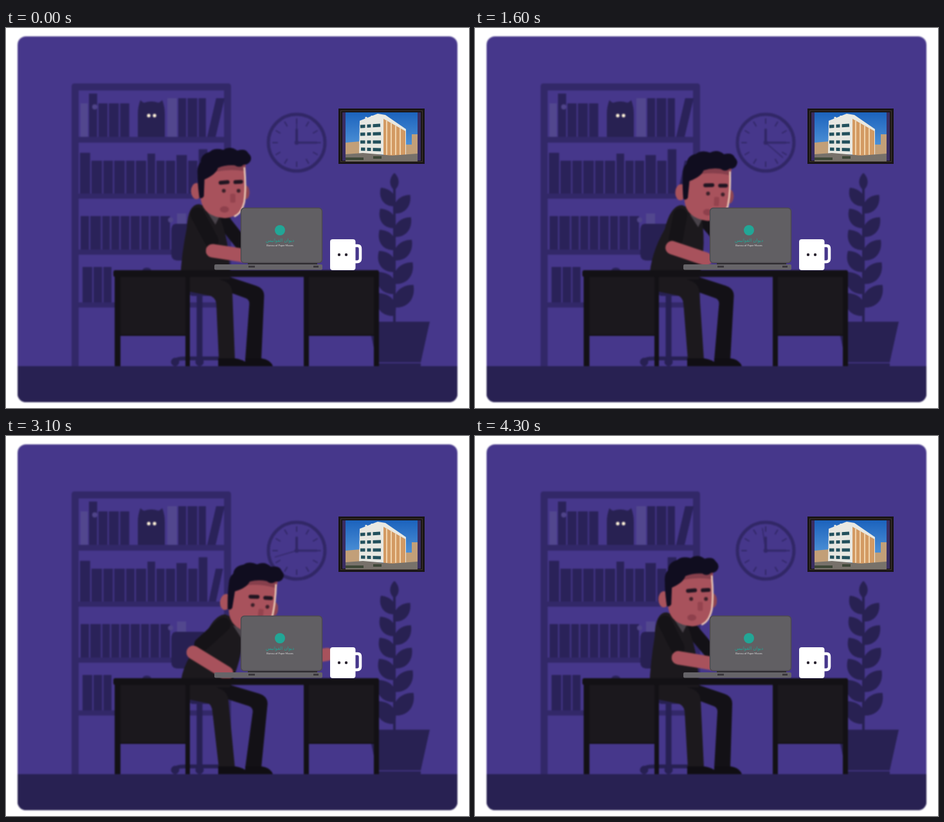
An HTML page that plays this animation: 720x590 px, repeating every 4400 ms.

```html
<!DOCTYPE html>
<html lang="en">
<head>
<meta charset="utf-8">
<title>Late night at the desk</title>
<style>
  html, body { margin: 0; width: 100%; height: 100%; overflow: hidden; background: #fff; }
  svg { display: block; width: 100vw; height: 100vh; }
  .soft { filter: blur(.8px); }
  .line { fill: none; stroke-linecap: round; stroke-linejoin: round; }
</style>
</head>
<body>
<svg viewBox="0 0 720 590">
  <defs>
    <clipPath id="panel"><rect x="18" y="13" width="684" height="568" rx="13"/></clipPath>
    <linearGradient id="sky" x1="0" y1="0" x2="0" y2="1">
      <stop offset="0" stop-color="#1c63bd"/><stop offset="1" stop-color="#64a6e2"/>
    </linearGradient>
  </defs>

  <g class="soft"><g clip-path="url(#panel)">
    <rect x="18" y="13" width="684" height="568" fill="#46378b"/>
    <rect x="18" y="525" width="684" height="56" fill="#282152"/>

    <g fill="#322868">
      <path d="M102 525V91Q102 86 107 86H345Q350 86 350 91V525H339V97H113V525Z"/>
      <path d="M104 169H348V178H104ZM104 257H348V265H104ZM104 344H348V352H104ZM104 426H348V434H104Z"/>
    </g>
    <g id="books"></g>
    <path d="M205 169V134Q205 122 209 112Q213 116 215 116Q226 112 237 116Q240 115 243 112Q247 122 247 134V169Z" fill="#282152"/>
    <g fill="#fff3d8"><circle cx="222" cy="136" r="2.7"/><circle cx="231" cy="136" r="2.7"/></g>
    <g fill="#4f4489"><circle cx="138" cy="122.500" r="4"/><circle cx="256" cy="298" r="4"/></g>
    <path d="M212 378Q212 372 219 372Q226 372 226 378Z" fill="#2a2259"/>

    <g class="line" stroke="#312766">
      <circle cx="452" cy="178" r="44" stroke-width="5"/>
      <g id="ticks" stroke-width="2"></g>
      <path d="M452 178V158" stroke-width="4"/>
      <path d="M452 178H483" stroke-width="3"/>
      <path id="second" d="M452 178V143" stroke-width="1.500"/>
      <circle cx="452" cy="178" r="3" fill="#312766"/>
    </g>

    <g fill="#282152">
      <path d="M563 456H659L645 519H577ZM579 520.500H645V525H579Z"/>
      <path d="M604 245V458" stroke="#282152" stroke-width="4"/>
      <g id="leaves"></g>
    </g>

    <g fill="#272052" stroke="#272052">
      <path d="M264 304H308L312 361H266Q257 361 257 350V316Q257 304 264 304Z" stroke="none"/>
      <path class="line" d="M290 411H326" stroke-width="10"/>
      <path class="line" d="M301 415V512" stroke-width="9"/>
      <path class="line" d="M264 516Q266 513 280 513H338" stroke-width="6"/>
      <circle cx="263" cy="518.500" r="6"/><circle cx="301" cy="518.500" r="6"/>
    </g>

    <path id="farLeg" fill="#131116"/>
    <path d="M372 525V513H398Q411 515 415 525Z" fill="#100e13"/>
    <path id="nearLeg" fill="#1c191d"/>
    <path d="M330 525V513H357Q374 516 378 525Z" fill="#100e13"/>

    <path id="farHand" class="line" stroke="#a8525c" stroke-width="20"/>
    <path id="farSleeve" class="line" stroke="#131116" stroke-width="21"/>
    <path id="torso" fill="#1c191d"/>
    <path id="collar" d="M314 284L334 290L327 304Z" fill="#49434a"/>

    <g id="head">
      <ellipse cx="374" cy="254" rx="6" ry="11" fill="#8f4652"/>
      <path d="M304 212V264Q308 292 342 294Q366 292 373 270L374 206Z" fill="#a8525c"/>
      <ellipse cx="297.500" cy="252" rx="8.500" ry="12.500" fill="#a8525c"/>
      <path d="M326 211H373V221Q350 217 327 222Z" fill="#863f4c"/>
      <path class="line" d="M372 216Q375 245 372 268Q368 286 357 291" stroke="#f2d2bd" stroke-width="2.500"/>
      <path d="M302 262Q299 240 299 225Q298 213 304 207Q304 195 318 191Q326 184 339 188Q350 181 361 189Q374 185 378 193Q385 199 381 206Q378 211 371 211Q365 217 357 212Q343 211 331 216Q328 226 310 234L309 260Q306 265 302 262Z" fill="#100d1f"/>
      <path class="line" d="M335 239L346 238M358 238L367 237.500" stroke="#201521" stroke-width="6"/>
      <circle cx="340" cy="251.500" r="3" fill="#3b2029"/>
      <circle cx="363" cy="251.500" r="3" fill="#3b2029"/>
      <rect x="350" y="256" width="8" height="14" rx="2" fill="#94434e"/>
      <ellipse cx="341" cy="280.500" rx="7" ry="5" fill="#8e404c"/>
    </g>

    <path id="sleeve" class="line" stroke="#151317" stroke-width="22"/>
    <path id="forearm" class="line" stroke="#a8525c" stroke-width="21"/>

    <path d="M169 380H286V525H279V478H178V525H169ZM463 380H580V525H572V478H471V525H463Z" fill="#131115"/>
    <path d="M178 386H279V476H178ZM471 386H572V476H471Z" fill="#1b181d"/>
    <rect x="167" y="376" width="413" height="10.500" rx="3" fill="#131115"/>
  </g></g>

  <g>
    <rect x="517" y="125" width="134" height="86" fill="#191515"/>
    <rect x="520.500" y="128.500" width="127" height="79" fill="none" stroke="#40352f"/>
    <rect x="523" y="131" width="122" height="75" fill="#3a2d63"/>
    <rect x="528" y="131" width="112" height="76" fill="url(#sky)"/>
    <path d="M528 178L551 176V198H528ZM620 181H640V198H620ZM631 165H640V183H631Z" fill="#c29f78"/>
    <path d="M550 144L578 133L590 135L622 157V198L549 195Z" fill="#e8e8e2"/>
    <path d="M587 141L621 160V198H587Z" fill="#d39a63"/>
    <path d="M592 143V197M599 147V197M606 151V197M613 155V197" stroke="#f0d3ac" stroke-width="2"/>
    <path d="M551 153L582 151M551 165L583 164M551 177H583M552 188L583 189" stroke="#22505c" stroke-width="5"/>
    <path d="M560 138V196M569 136V197" stroke="#e8e8e2" stroke-width="3"/>
    <path d="M528 196L555 194L600 198L640 195V207H528Z" fill="#77716a"/>
    <path d="M528 201H556V205H528ZM571 199H584V203H571Z" fill="#3d4737"/>
  </g>

  <g id="cup">
    <rect x="-20" y="-24" width="39.500" height="48" rx="4" fill="#fff"/>
    <path d="M18 -14H23Q27 -14 27 -9V6Q27 11 22 11H18" fill="none" stroke="#fff" stroke-width="4.500"/>
    <circle cx="-6" r="2.200" fill="#2a2430"/><circle cx="5" r="2.200" fill="#2a2430"/>
  </g>

  <g>
    <rect x="376" y="362" width="108" height="7" fill="#29272b"/>
    <rect x="365.500" y="279.500" width="126" height="85" rx="5" fill="#615f63" stroke="#4d4a4f" stroke-width="1.500"/>
    <rect x="324" y="367" width="168" height="8.500" rx="2" fill="#666468"/>
    <path d="M377 370.500H387M478 370.500H486" stroke="#3b383d" stroke-width="3"/>
    <circle cx="426" cy="314" r="8" fill="#22a696"/>
    <g text-anchor="middle">
      <text x="426" y="332" font-size="7" fill="#22a696" font-family="'DejaVu Sans', sans-serif">ديوان الفوانيس</text>
      <text x="426" y="338.500" font-size="4" fill="#dedede" font-family="Lato, sans-serif">Bureau of Paper Moons</text>
    </g>
  </g>
</svg>
<script>
const LOOP = 4400, STEP = 100, TYPING = 760;
const el = id => document.getElementById(id);
const set = (id, name, value) => el(id).setAttribute(name, value);

let seed = 7;
const random = () => (seed = seed * 16807 % 2147483647) / 2147483647;

// Fills a stretch of shelf; the first book may be pale and the last may lean.
function stack(floor, left, right, height, pale, lean) {
  let books = '';
  for (let x = left; x < right - 8;) {
    const width = Math.min(11 + random() * 6, right - x);
    const top = floor - height - (random() < .3 ? 5 + random() * 14 : 0);
    const color = pale && x === left ? '#52478e' : '#2a2259';
    const shift = x + width > right - 10 ? lean : 0;
    books += `<path fill="${color}" d="M${x} ${floor}L${x + shift} ${top}h${width}L${x + width} ${floor}Z"/>`;
    x += width + 2;
  }
  return books;
}
el('books').innerHTML =
  stack(169, 116, 198, 52, true, 0) + stack(169, 251, 326, 60, true, 14) +
  stack(257, 115, 330, 51, false, 11) + stack(344, 116, 264, 52, false, 0) +
  stack(344, 266, 281, 56, true, 0) + stack(426, 119, 168, 55, false, 0);

el('ticks').innerHTML = Array.from({ length: 12 }, (_, i) =>
  `<path d="M452 141V148" transform="rotate(${i * 30} 452 178)"/>`).join('');

const leaf = (y, angle, length, width) =>
  `<path d="M0 0C${-width} ${-length * .3} ${-width * .75} ${-length * .75} 0 ${-length}
    C${width * .75} ${-length * .75} ${width} ${-length * .3} 0 0Z"
    transform="translate(604 ${y}) rotate(${angle})"/>`;
let leaves = leaf(252, 0, 27, 10);
for (let i = 0; i < 6; i++) {
  leaves += leaf(277 + 34 * i, -36, 36 + 1.6 * i, 15 + i);
  if (i < 5) leaves += leaf(288 + 36.5 * i, 40, 38 + 2 * i, 15 + i);
}
el('leaves').innerHTML = leaves;

const mix = (a, b, u) => a + (b - a) * u;
function ramp(t, from, to) {
  const u = Math.min(1, Math.max(0, (t - from) / (to - from)));
  return u * u * (3 - 2 * u);
}

function draw(t) {
  // He leans over to fetch the cup, drinks, puts it back and types on.
  const reach = ramp(t, 1250, 1950) - ramp(t, 3150, 3550);
  const lift = ramp(t, 1950, 2350) - ramp(t, 2650, 3050);
  const lean = reach - lift;
  const typingTime = (t < 2000 ? t + LOOP : t) - 3900;
  const typing = Math.cos(2 * Math.PI * typingTime / TYPING);
  const calm = (1 - reach) ** 2;

  const dx = 39 * lean - 8 * lift + calm * (1.8 + 5.7 * typing);
  const dy = 10 * lean - 6 * lift + calm * (.8 - .8 * typing);
  const tilt = 7 * lean - 2 * lift;
  set('head', 'transform', `translate(${dx} ${dy}) rotate(${tilt} 335 290)`);
  set('collar', 'transform', `translate(${dx} ${dy})`);
  set('second', 'transform', `rotate(${360 * t / LOOP} 452 178)`);

  const shoulderY = 273 + dy * .4;
  set('torso', 'd', `M271 390Q273 350 ${282 + dx * .65} ${310 + dy * .5}Q${284 + dx} ${shoulderY} ${302 + dx} ${shoulderY}
    L${330 + dx} ${284 + dy * .5}Q${350 + dx * .6} 330 348 390Z`);

  const elbowX = 316 - 25 * lean + 11.5 * calm * (1 + typing);
  const elbowY = 336 + (elbowX - 291) * .33;
  const bend = Math.max(0, 316 - elbowX);
  const shoulder = [299 + dx, 289 + dy * .4];
  set('sleeve', 'd', `M${shoulder}L${mix(shoulder[0], elbowX + 4, .8)} ${mix(shoulder[1], elbowY, .72)}`);
  set('forearm', 'd', `M${elbowX} ${elbowY}L${368 - bend} ${353 + bend * .6}`);

  const cupX = mix(524, 376, lift), cupY = mix(352, 283, lift);
  set('cup', 'transform', `translate(${cupX} ${cupY}) rotate(${-40 * lift})`);

  const farElbow = [372 + 53 * lean + 6 * lift, 342 + 8 * reach];
  const grip = [mix(cupX - 24, cupX - 2, lift), mix(cupY - 13, cupY + 17, lift)];
  set('farSleeve', 'd', `M${338 + dx} ${297 + dy * .4}L${farElbow}`);
  set('farHand', 'd', `M${farElbow}L${mix(390, grip[0], reach)} ${mix(356, grip[1], reach)}`);

  const near = (elbowX - 316) * .2, far = Math.abs(elbowX - 316) * .27;
  set('nearLeg', 'd', `M272 384H312L${336 + near} 392Q${350 + near} 396 ${351 + near} 412L356 515H331
    L${326 + near} 428Q${325 + near} 417 314 415L284 409Z`);
  set('farLeg', 'd', `M300 384H340L${387 + far} 400Q${400 + far} 404 ${400 + far} 416L397 515H372
    L${377 + far} 428Q${377 + far} 421 ${370 + far} 419L330 404Z`);
}

const start = performance.now();
function frame() {
  const elapsed = (performance.now() - start) % LOOP;
  draw(Math.floor(elapsed / STEP) * STEP);
  requestAnimationFrame(frame);
}
frame();
</script>
</body>
</html>
```
